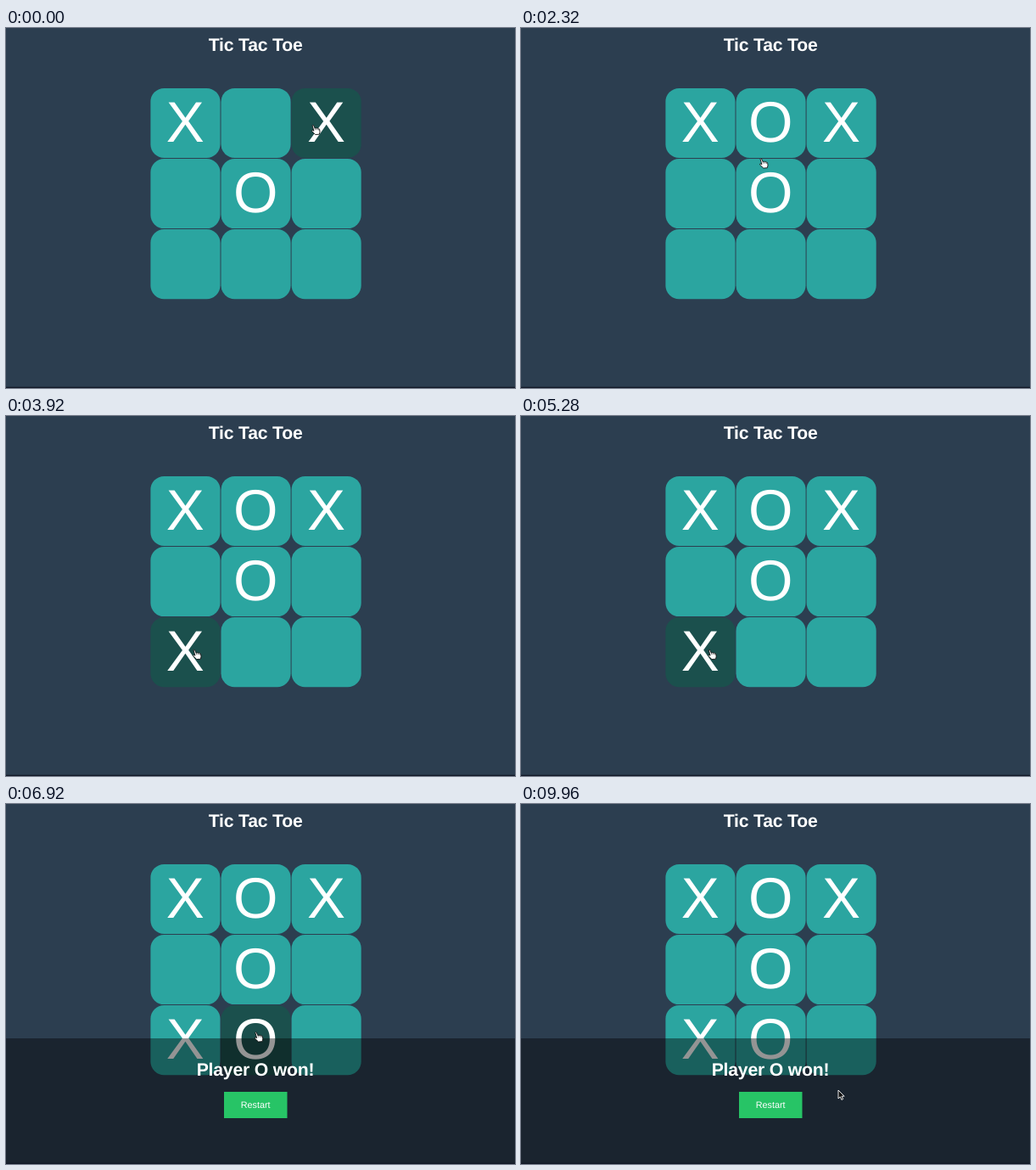
An HTML page for the animation above (10 s loop, 600 by 424 pixels).

```html
<!DOCTYPE html>
<html lang="en">
<head>
<meta charset="utf-8">
<title>Tic Tac Toe</title>
<style>
  html, body { margin: 0; width: 100%; height: 100%; overflow: hidden; background: #2c3e50; }
  svg { display: block; }
  text {
    fill: #fff; text-anchor: middle; text-rendering: geometricPrecision;
    font-family: "Liberation Sans", Arial, sans-serif;
  }
  .head { font-size: 21.2px; font-weight: bold; letter-spacing: -.2px; }
  .mark { font-size: 67.5px; }
  .label { font-size: 10.8px; }
  .cell { fill: #2ba5a0; }
  .cell.hover { fill: #1b504d; }
</style>
</head>
<body>
<svg width="600" height="424" viewBox="0 0 600 424">
  <rect width="600" height="424" fill="#2c3e50"/>
  <text class="head" x="294.2" y="27.2">Tic Tac Toe</text>
  <g id="board"></g>
  <g id="result">
    <rect y="276" width="600" height="148" fill="#000" fill-opacity=".42"/>
    <text class="head" x="294" y="320.4">Player O won!</text>
    <rect x="257" y="339" width="74.5" height="31" fill="#27c466"/>
    <text class="label" x="294.2" y="358.4">Restart</text>
  </g>
  <rect y="422.7" width="600" height="1.3" fill="#121827"/>
  <g id="cursor" stroke-linejoin="round">
    <g id="hand" stroke="#111" stroke-width=".9">
      <path fill="#fff" d="M-.9 .8Q-.5 -.3 .5 .5L2.2 4.2L3.4 3.7L4.5 4.2L5.6 3.9L6.4 4.6Q7.5 4.5 7.7 5.8L8 8.2L7.4 11.2L2.8 11.6L-1.4 7.6Q-1.8 6.3 -.3 6.5L.9 7.2Z"/>
      <path fill="none" stroke-width=".6" d="M2.2 4.2L2.8 6.2M4.4 4.2L4.8 6.2M6.3 4.6L6.6 6.4"/>
    </g>
    <path id="arrow" fill="#111" stroke="#fff" stroke-width=".9"
      d="M0 0V10L2.3 7.9L3.9 11.4L5.6 10.6L4.1 7.2H7.1Z"/>
  </g>
</svg>
<script>
const LOOP = 10000, STEP = 40, WIN = 6600, PANEL = 276;
const SIZE = 82.1, PITCH = 83.1, LEFT = 170.4, TOP = 70.9;

// Cells in order of play, X first; the opening three are already down.
const order = [0, 4, 2, 1, 6, 7];
const clicks = [0, 0, 0, 1700, 3760, WIN];

// Where the pointer rests: [arrive, leave, x, y]
const rests = [
  [0, 400, 362, 114],
  [1160, 1900, 295, 135],
  [2320, 2640, 283, 153.5],
  [3700, 5260, 222, 275],
  [5960, 6720, 294, 261],
  [7700, 8480, 301, 330],
  [9300, LOOP, 374, 337]
];

const $ = id => document.getElementById(id);
const show = (el, on) => el.style.display = on ? "" : "none";
const corner = i => [LEFT + i % 3 * PITCH, TOP + Math.floor(i / 3) * PITCH];

function add(tag, attrs, content = "") {
  const el = document.createElementNS("http://www.w3.org/2000/svg", tag);
  for (const name in attrs) el.setAttribute(name, attrs[name]);
  el.textContent = content;
  return $("board").appendChild(el);
}

const cells = Array.from({ length: 9 }, (_, i) => {
  const [x, y] = corner(i);
  return add("rect", { class: "cell", x, y, width: SIZE, height: SIZE, rx: 16 });
});

const marks = order.map((cell, n) => {
  const [x, y] = corner(cell);
  return add("text", { class: "mark", x: x + SIZE / 2 - .2, y: y + 63.3 }, "XO"[n % 2]);
});

// Rest at each stop, then ease to the next one.
function pointer(t) {
  const n = rests.findLastIndex(r => r[0] <= t);
  const [, leave, x, y] = rests[n];
  if (t <= leave) return [x, y];
  const [arrive, , nx, ny] = rests[n + 1];
  const u = (t - leave) / (arrive - leave), e = u * u * (3 - 2 * u);
  return [x + (nx - x) * e, y + (ny - y) * e];
}

function draw(t) {
  const [x, y] = pointer(t);
  const won = t >= WIN, covered = won && y >= PANEL;
  cells.forEach((cell, i) => {
    const [cx, cy] = corner(i);
    const inside = x >= cx && x < cx + SIZE && y >= cy && y < cy + SIZE;
    cell.classList.toggle("hover", inside && !covered);
  });
  marks.forEach((mark, n) => show(mark, t >= clicks[n]));
  show($("result"), won);
  show($("hand"), !covered);
  show($("arrow"), covered);
  $("cursor").setAttribute("transform", `translate(${x} ${y})`);
}

const start = performance.now();
function tick() {
  const t = (performance.now() - start) % LOOP;
  draw(Math.floor(t / STEP) * STEP);
  requestAnimationFrame(tick);
}
tick();
</script>
</body>
</html>
```
